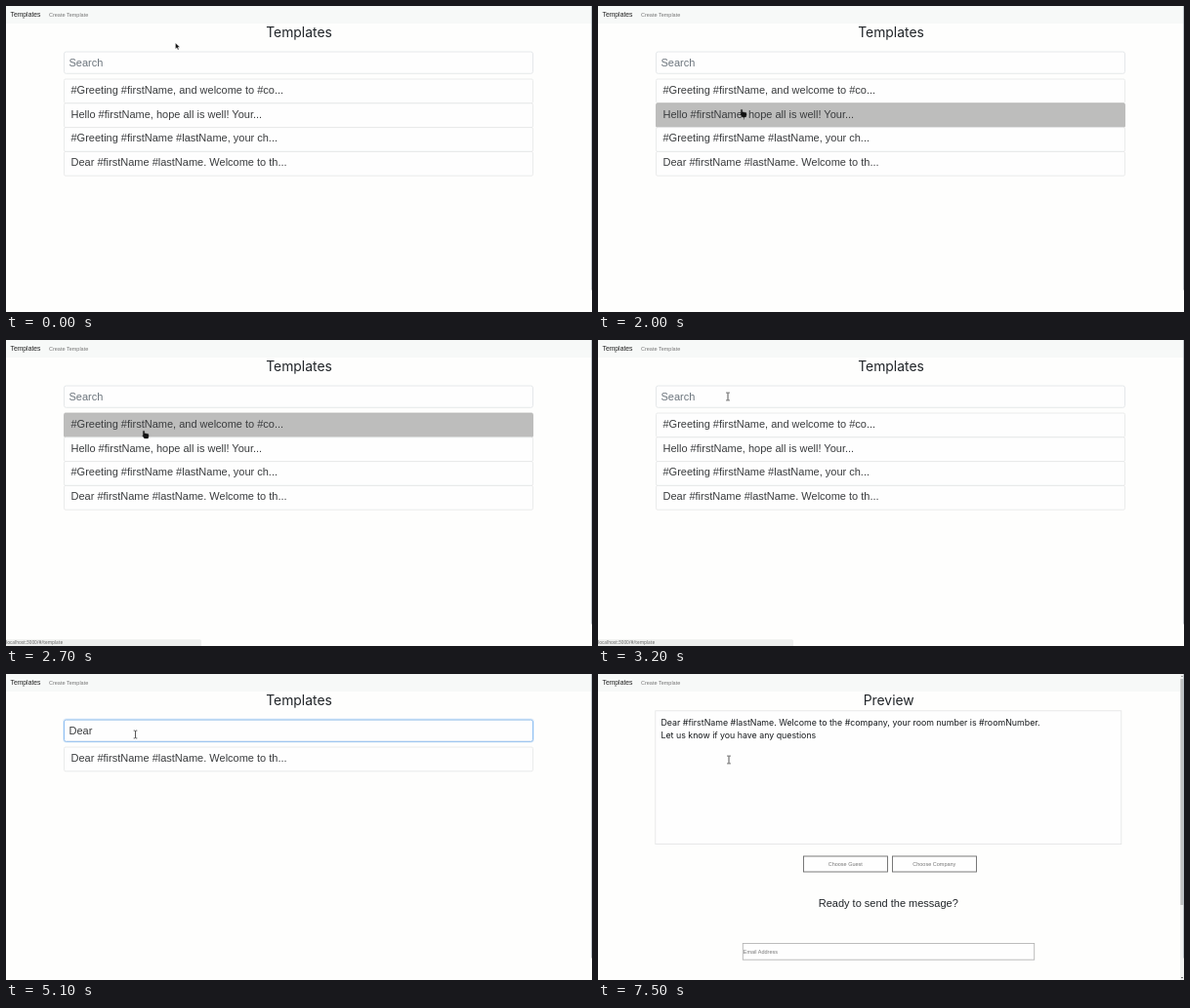
An HTML page for the animation above (8 s loop, 600 px wide and 314 px high).

```html
<!DOCTYPE html>
<html lang="en">
<head>
<meta charset="utf-8">
<title>Templates</title>
<style>
  html, body { margin: 0; width: 100%; height: 100%; overflow: hidden; background: #fefefd; }
  svg { display: block; width: 100%; height: 100%; }
  text { font-family: "Liberation Sans", Arial, sans-serif; white-space: pre; }
  .heading { font: 13.9px Inter, sans-serif; fill: #212529; text-anchor: middle; }
  .message { font: 8.82px Inter, sans-serif; fill: #16191c; }
  .status { font: 4.7px "Noto Sans", sans-serif; fill: #666; }
  .brand { font-size: 6.8px; fill: #222; }
  .small { font-size: 5.5px; fill: #777; }
  .item { font-size: 11px; fill: #3a3c3e; }
  .hint { font-size: 11px; fill: #6c757d; }
  .middle { text-anchor: middle; }
</style>
</head>
<body>
<svg id="stage" viewBox="0 0 600 314"></svg>
<script>
const LOOP = 8000, STEP = 100;
const PREVIEW_AT = 6300;
const stage = document.getElementById('stage');

const templates = [
  '#Greeting #firstName, and welcome to #co...',
  'Hello #firstName, hope all is well! Your...',
  '#Greeting #firstName #lastName, your ch...',
  'Dear #firstName #lastName. Welcome to th...'
];
const ROW_TOP = 75, ROW_HEIGHT = 24.8;

// time, x, y of the pointer's centre
const pointerPath = [
  [0, 176, 41.5], [1400, 176, 41.5], [1800, 156, 88], [1900, 150, 105],
  [2000, 149, 110], [2300, 150, 162], [2400, 150.5, 158], [2500, 150.5, 144],
  [2600, 147, 99], [2700, 143, 97], [2900, 138, 70], [3200, 133, 58],
  [3500, 132.5, 62], [5400, 132.5, 62], [5700, 131, 86], [6200, 132, 88.5],
  [7300, 132.7, 87.5], [7500, 134, 88]
];
const keystrokes = [[3800, 'D'], [4300, 'e'], [4400, 'a'], [4500, 'r']];

const glyphs = {
  arrow: '<path d="M-2.5-3.5v6l1.5-1.3 1 2.2 1-.5-1-2.1h2z" fill="#111" stroke="#fff" stroke-width=".3"/>',
  hand: '<path d="M-2.6-3.6h1.3v2.4l4 .7.4 2-.7 2.4h-3.7l-2-2.8.7-.6z" fill="#111" stroke="#222" stroke-width=".4"/>',
  beam: '<path d="M-1.8-3.9h1.2l.6.4.6-.4h1.2M0-3.5v7M-1.8 3.9h1.2l.6-.4.6.4h1.2" fill="none" stroke="#444" stroke-width=".9"/>'
};

const clamp = v => Math.max(0, Math.min(1, v));
const text = (cls, x, y, content, extra = '') =>
  `<text class="${cls}" x="${x}" y="${y}" ${extra}>${content}</text>`;
const rect = (x, y, w, h, fill, stroke = 'none', extra = '') =>
  `<rect x="${x}" y="${y}" width="${w}" height="${h}" fill="${fill}" stroke="${stroke}" ${extra}/>`;

function pointerAt(t) {
  const next = pointerPath.findIndex(p => p[0] > t);
  if (next < 0) return pointerPath.at(-1).slice(1);
  const [t0, x0, y0] = pointerPath[Math.max(0, next - 1)];
  const [t1, x1, y1] = pointerPath[next];
  const k = (t - t0) / (t1 - t0);
  return [x0 + (x1 - x0) * k, y0 + (y1 - y0) * k];
}

function pointer(t, overRows) {
  const [x, y] = pointerAt(t);
  let kind = 'arrow';
  if (t >= PREVIEW_AT) kind = t < 7400 ? 'hand' : 'beam';
  else if (overRows) kind = 'hand';
  else if (y > 47 && y < 70) kind = 'beam';
  return `<g transform="translate(${x} ${y})">${glyphs[kind]}</g>`;
}

function navbar() {
  return rect(0, 0, 600, 18, '#f7f9f8') +
    text('brand', 4.5, 11, 'Templates') +
    text('small', 44, 10.7, 'Create Template');
}

function searchBox(t, typed) {
  const focus = clamp((t - 3200) / 300);
  const caretOn = t >= 3400 && !(t >= 5100 && t < 5600) && t < 6100;
  const box = 'rx="2"';
  return rect(58.5, 46, 482, 24, 'none', '#cfe4fb', `rx="2.5" opacity="${focus * .6}"`) +
    rect(59.5, 47, 480, 22.3, '#fefefe', '#dfe2e5', box + ' stroke-width=".8"') +
    rect(59.5, 47, 480, 22.3, 'none', '#8fbff2', `${box} opacity="${focus}"`) +
    (typed
      ? `<text class="item" x="64.5" y="61.8">${typed}<tspan id="end"></tspan></text>`
      : text('hint', 64.5, 61.8, 'Search')) +
    (caretOn ? '<path id="caret" d="M64.8 52.5v11" stroke="#444" stroke-width=".7"/>' : '');
}

function list(items, hovered) {
  return items.map((label, i) => {
    const y = ROW_TOP + i * ROW_HEIGHT, hot = i === hovered;
    return rect(59.5, y, 480, ROW_HEIGHT, hot ? '#bdbdbc' : '#fefefe',
      hot ? '#b5b5b4' : '#e5e6e6', 'rx="1.5" stroke-width=".8"') +
      text('item', 66.5, y + 14.8, label);
  }).join('');
}

function statusBar(t) {
  const visible = t >= 2400 && t < 3400 || t >= 5900 && t < 6700;
  if (!visible) return '';
  const fading = t >= 3300 && t < 3400 || t >= 6600;
  return `<g opacity="${fading ? .5 : 1}">` +
    '<path d="M0 307.3h198.5q1.5 0 1.5 1.5V314H0z" fill="#eeefee"/>' +
    text('status', 0, 312.4, 'localhost:3000/#/template') + '</g>';
}

function listPage(t) {
  const typed = keystrokes.filter(k => k[0] <= t).map(k => k[1]).join('');
  const items = typed.length < 2 ? templates : templates.filter(s => s.startsWith(typed));
  const rowAt = time => Math.floor((pointerAt(time)[1] - ROW_TOP) / ROW_HEIGHT);
  const hovered = rowAt(Math.max(0, t - STEP));
  const row = rowAt(t);
  return text('heading', 300, 31.8, 'Templates') +
    searchBox(t, typed) + list(items, hovered) + statusBar(t) +
    pointer(t, row >= 0 && row < items.length);
}

function button(x, label) {
  return rect(x + .5, 187, 86, 16, '#fefefe', '#6b6b6b', 'stroke-width=".9"') +
    text('small middle', x + 43.3, 197, label);
}

function scrollbar() {
  return rect(596, 0, 4, 314, '#f1f2f1') + rect(596.4, 5, 3.2, 232, '#bfc1c1') +
    '<path d="M596.8 3l1.2-1.6 1.2 1.6z" fill="#888"/>' +
    '<path d="M596.8 311l1.2 1.6 1.2-1.6z" fill="#444"/>';
}

function previewPage(t) {
  return text('heading', 297.7, 31.8, 'Preview') +
    rect(58.8, 37.8, 477, 136.8, '#fefefe', '#e3e4e4', 'stroke-width=".8"') +
    text('message', 64.5, 53, 'Dear #firstName #lastName. Welcome to the #company, your room number is #roomNumber.') +
    text('message', 64.5, 65.6, 'Let us know if you have any questions') +
    button(210, 'Choose Guest') + button(301, 'Choose Company') +
    text('item middle', 297.3, 239, 'Ready to send the message?', 'style="fill:#212529"') +
    rect(148.3, 276.5, 298.4, 16.7, '#fefefe', '#b5b5b5', 'stroke-width=".9"') +
    text('small', 148.8, 286.7, 'Email Address') +
    scrollbar() + statusBar(t) + pointer(t);
}

function render(t) {
  stage.innerHTML = rect(0, 0, 600, 314, '#fefefd') + navbar() +
    (t < PREVIEW_AT ? listPage(t) : previewPage(t)) +
    rect(599.2, 0, .8, 291.5, '#b4bcc4');
  const caret = document.getElementById('caret');
  const field = document.getElementById('end')?.parentNode;
  if (caret && field) caret.setAttribute('transform', `translate(${field.getComputedTextLength()})`);
}

const start = performance.now();
let shown = -1;
function tick() {
  const t = Math.floor((performance.now() - start) % LOOP / STEP) * STEP;
  if (t !== shown) render(shown = t);
  requestAnimationFrame(tick);
}
tick();
</script>
</body>
</html>
```
